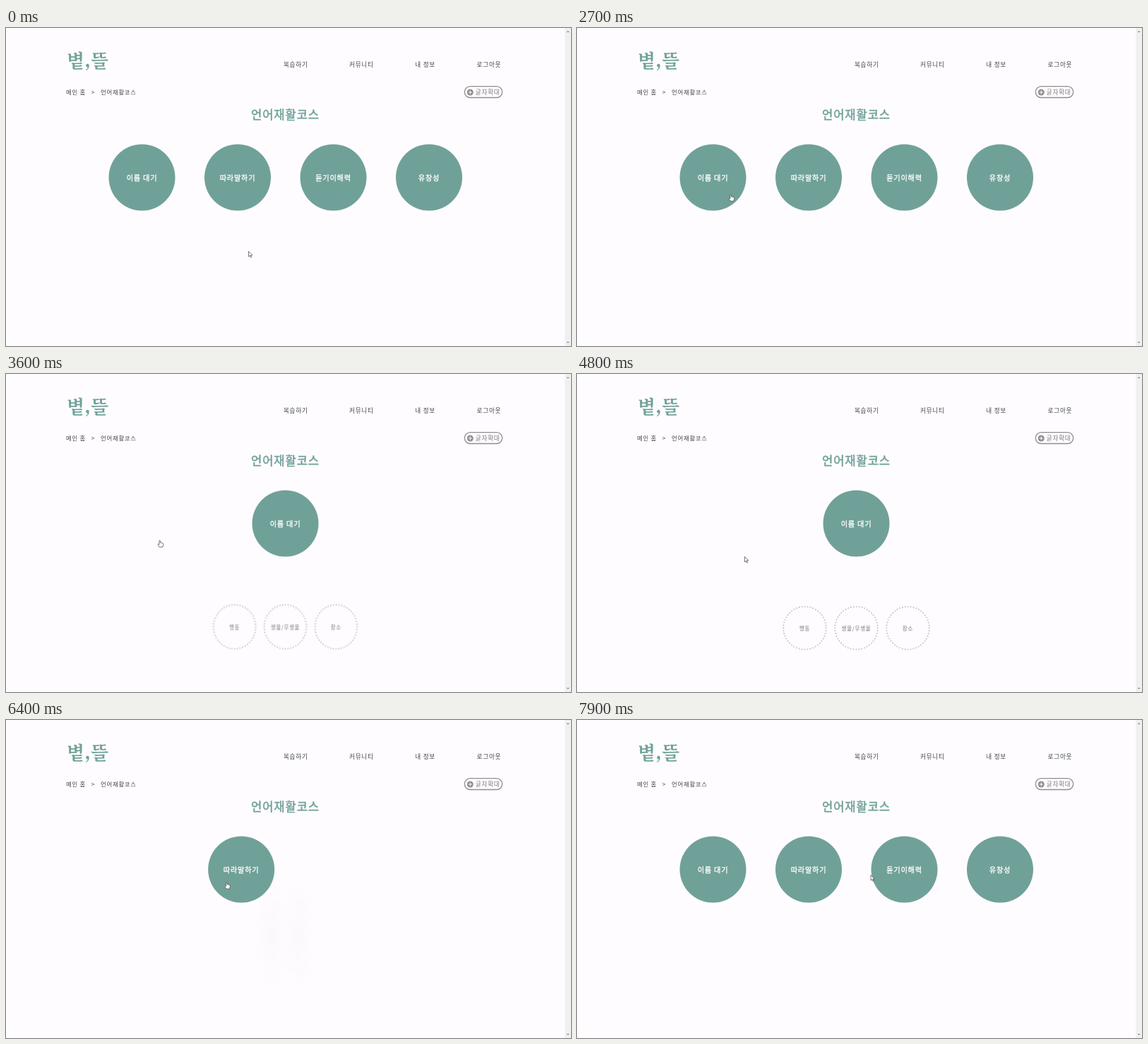
An HTML page with a canvas for the animation above (8000 ms loop, 800x450 px).

```html
<!DOCTYPE html>
<html lang="ko">
<head>
<meta charset="utf-8">
<style>
html, body { margin: 0; width: 100%; height: 100%; overflow: hidden; background: #fefcff; }
canvas { display: block; }
</style>
</head>
<body>
<canvas id="stage" width="800" height="450"></canvas>
<script>
const LOOP = 8000, STEP = 100;
const SANS = '"Noto Sans CJK KR", "Noto Sans CJK", "Noto Sans", sans-serif';
const SERIF = '"Noto Serif CJK KR", "Noto Sans CJK KR", serif';
const TEAL = '#70a199', PAGE = '#fefcff', GRAY = '#918d8f';
const MID = 395.5, ROW_Y = 211.5, RADIUS = 47;
const SUB_Y = 359.5, SUB_TOP = 140.5, SUB_GAP = 73;
const MOVE_DELAY = 105, MOVE_MS = 400, SLIDE_MS = 1500, PX = 800 / 1920;

const courses = [
  { name: '이름 대기', x: 192.5, subs: ['행동', '생물/무생물', '장소'] },
  { name: '따라말하기', x: 328, subs: ['2음절 연습', '3음절 연습'] },
  { name: '듣기이해력', x: 463.5 },
  { name: '유창성', x: 599 }
];

// Periods in which one course is opened
const picks = [
  { course: courses[0], from: 2754, to: 5450 },
  { course: courses[1], from: 6260, to: 7650 }
];

// Pointer path: time, x, y
const path = [
  [1600, 343.5, 316], [2500, 217.7, 235.3], [4000, 217.7, 235.3],
  [4700, 237.5, 258.5], [4900, 237.5, 258.5], [5300, 370, 226],
  [5700, 370, 226], [6200, 312.3, 229.3], [6400, 312.3, 229.3],
  [7200, 418, 219.5], [7700, 418, 219.5], [7800, 416, 219.5]
];
const handTimes = [[2400, 4100], [5200, 7800]];
const arrow = new Path2D('M0 0V16L3.8 12.6L6.4 18.5L8.8 17.4L6.3 11.6H11.4Z');
const hand = new Path2D('M-1.6 1.5Q0 -1 1.6 1.5V7L9 8.7Q11 9.5 10.6 13L9 20.5H-1L-5.5 13.5Q-5.5 10.5 -3 11.5L-1.6 13Z');

const stage = document.getElementById('stage').getContext('2d');
const layer = document.createElement('canvas');
layer.width = 800;
layer.height = 450;
const menu = layer.getContext('2d');

function bezier(x1, y1, x2, y2) {
  const at = (a, b, u) => 3 * a * u * (1 - u) ** 2 + 3 * b * u * u * (1 - u) + u ** 3;
  return x => {
    if (x <= 0) return 0;
    if (x >= 1) return 1;
    let lo = 0, hi = 1;
    for (let i = 0; i < 30; i++) {
      const u = (lo + hi) / 2;
      if (at(x1, x2, u) < x) lo = u; else hi = u;
    }
    return at(y1, y2, lo);
  };
}
const ease = bezier(.25, .1, .25, 1);
const easeOut = bezier(.23, 1, .32, 1);

// y is the middle of the glyphs; thick adds an outline for a medium weight
function text(c, str, x, y, size, color, { weight = 400, align = 'left', gap = .76, family = SANS, thick = 0 } = {}) {
  c.font = `${weight} ${size}px ${family}`;
  c.letterSpacing = gap + 'px';
  c.textAlign = align;
  c.fillStyle = color;
  c.fillText(str, x, y + size * .38);
  if (thick) {
    c.strokeStyle = color;
    c.lineWidth = thick;
    c.lineJoin = 'round';
    c.strokeText(str, x, y + size * .38);
  }
}

function disc(c, x, y, r, color) {
  c.fillStyle = color;
  c.beginPath();
  c.arc(x, y, r, 0, Math.PI * 2);
  c.fill();
}

function triangle(x, y, dir) {
  stage.fillStyle = '#8a898b';
  stage.beginPath();
  stage.moveTo(x - 2, y + dir);
  stage.lineTo(x + 2, y + dir);
  stage.lineTo(x, y - dir);
  stage.fill();
}

function drawPage() {
  stage.fillStyle = PAGE;
  stage.fillRect(0, 0, 800, 450);
  stage.fillStyle = '#f0eff1';
  stage.fillRect(791.3, 0, 8.7, 450);
  triangle(795.7, 5, 1);
  triangle(795.7, 445, -1);

  text(stage, '볕,뜰', 86, 46, 26, TEAL, { weight: 700, gap: 0, family: SERIF });
  [['복습하기', 392.9], ['커뮤니티', 486], ['내 정보', 579.3], ['로그아웃', 666.6]]
    .forEach(([str, x]) => text(stage, str, x, 51.3, 8.6, '#444'));
  [['메인 홈', 85], ['>', 120.8], ['언어재활코스', 134]]
    .forEach(([str, x]) => text(stage, str, x, 91, 8.4, '#444'));
  text(stage, '언어재활코스', MID, 122.5, 16.6, TEAL, { align: 'center', gap: .9, thick: .55 });

  stage.strokeStyle = GRAY;
  stage.lineWidth = 1.3;
  stage.beginPath();
  stage.roundRect(649.3, 82.7, 53.4, 15.8, 7.9);
  stage.stroke();
  disc(stage, 657.3, 91, 4.5, GRAY);
  stage.fillStyle = PAGE;
  stage.fillRect(654.7, 90.5, 5.2, 1);
  stage.fillRect(656.8, 88.4, 1, 5.2);
  text(stage, '글자확대', 664.8, 91, 8.6, '#7c797b');
}

function drawCourse({ name }, x) {
  disc(stage, x, ROW_Y, RADIUS, TEAL);
  text(stage, name, x, 212, 10.2, '#fff', { align: 'center', thick: .3 });
}

function drawMenu(subs, p) {
  const blur = 40 * PX * (1 - p);
  menu.clearRect(0, 0, 800, 450);
  menu.filter = blur > .05 ? `blur(${blur}px)` : 'none';
  menu.strokeStyle = '#c8c6c8';
  menu.lineWidth = 2.1;
  menu.lineCap = 'round';
  const r = 30.3;
  menu.setLineDash([0, 2 * Math.PI * r / 48]);
  subs.forEach((name, i) => {
    const x = MID + (i - (subs.length - 1) / 2) * SUB_GAP;
    menu.beginPath();
    menu.arc(x, SUB_Y, r, 0, Math.PI * 2);
    menu.stroke();
    text(menu, name, x, SUB_Y + .5, 7.5, '#757375', { align: 'center' });
  });

  stage.save();
  stage.globalAlpha = p;
  stage.translate(MID, SUB_TOP - 1000 * PX * (1 - p));
  stage.scale(.2 + .8 * p, 2.5 - 1.5 * p);
  stage.drawImage(layer, -MID, -SUB_TOP);
  stage.restore();
}

function pointerAt(t) {
  const i = path.findIndex(k => k[0] > t);
  if (i === 0) return path[0].slice(1);
  if (i < 0) return path[path.length - 1].slice(1);
  const [t0, x0, y0] = path[i - 1], [t1, x1, y1] = path[i];
  const u = (t - t0) / (t1 - t0), s = u * u * (3 - 2 * u);
  return [x0 + (x1 - x0) * s, y0 + (y1 - y0) * s];
}

function drawPointer(t) {
  const shape = handTimes.some(([a, b]) => t >= a && t < b) ? hand : arrow;
  stage.save();
  stage.translate(...pointerAt(t));
  stage.scale(.47, .47);
  stage.fillStyle = '#fff';
  stage.fill(shape);
  stage.strokeStyle = '#4a494c';
  stage.lineWidth = 1.6;
  stage.lineJoin = 'round';
  stage.stroke(shape);
  stage.restore();
}

function draw(t) {
  drawPage();
  const pick = picks.find(k => t >= k.from && t < k.to);
  if (pick) {
    const { course } = pick, age = t - pick.from;
    const moved = ease((age - MOVE_DELAY) / MOVE_MS);
    drawMenu(course.subs, easeOut(age / SLIDE_MS));
    drawCourse(course, course.x + (MID - course.x) * moved);
  } else {
    courses.forEach(c => drawCourse(c, c.x));
  }
  drawPointer(t);
}

const start = performance.now();
function tick() {
  const t = (performance.now() - start) % LOOP;
  draw(Math.floor(t / STEP) * STEP);
  requestAnimationFrame(tick);
}
tick();
</script>
</body>
</html>
```
